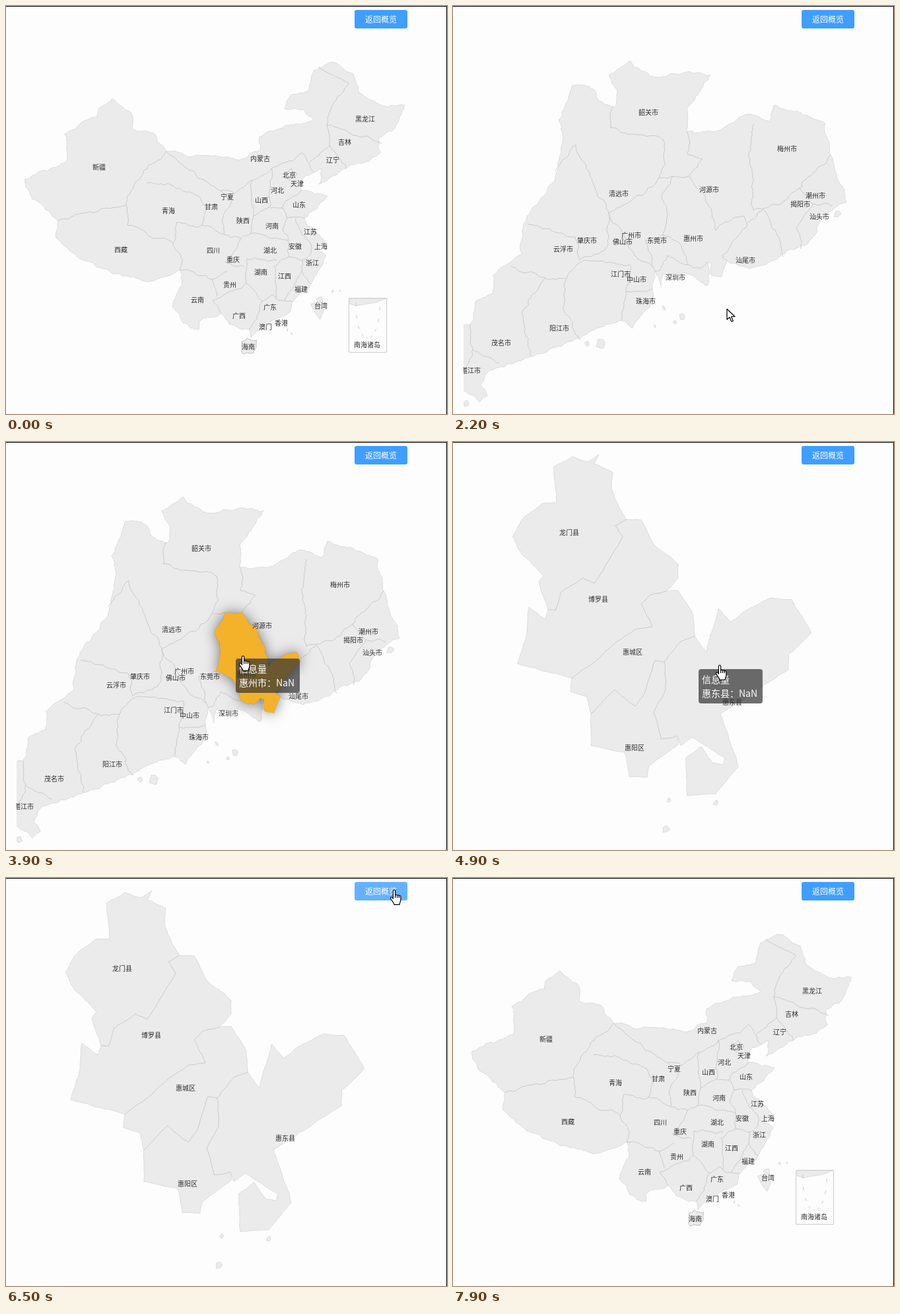
Write an HTML page that moves like this. It is 668x618 px and loops after 8 s.

```html
<!DOCTYPE html>
<html lang="zh">
<head>
<meta charset="utf-8">
<title>地图下钻</title>
<style>
  html, body { margin: 0; width: 100%; height: 100%; overflow: hidden; background: #fdfdfd; }
  svg { position: absolute; left: 0; top: 0; font-family: "Noto Sans CJK SC", "Noto Sans CJK", sans-serif; }
  .land { fill: #ebebeb; stroke: #d6d6d6; stroke-width: .8; stroke-linejoin: round; }
  .line { fill: none; stroke: #c6c6c6; stroke-width: .9; stroke-linejoin: round; }
  .area { fill: none; }
  .area.on { fill: #f4b22a; filter: drop-shadow(0 0 10px rgba(0,0,0,.5)); }
  .label { font-size: 10px; fill: #2b2b2b; text-anchor: middle; }
  #button { fill: #409eff; }
  #button.on { fill: #66b1ff; }
  #tip rect { fill: rgba(50,50,50,.7); }
  #tip text { font-size: 14px; font-weight: 500; fill: #fff; }
  #cursor path { fill: #fff; stroke: #000; stroke-width: 1.2; stroke-linejoin: round; }
</style>
</head>
<body>
<svg width="668" height="618" viewBox="0 0 668 618">
  <clipPath id="view"><rect x="16" width="652" height="608"/></clipPath>
  <g id="maps" clip-path="url(#view)"></g>
  <rect id="button" x="528" y="6" width="80" height="28" rx="3"/>
  <text x="568" y="24.5" font-size="12" font-weight="500" fill="#fff" text-anchor="middle">返回概览</text>
  <path d="M0 .5H667.5V618" fill="none" stroke="#000"/>
  <g id="tip">
    <rect id="tipBox" height="52" rx="4"/>
    <text x="5" y="21">信息量</text>
    <text x="5" y="42" id="tipName"></text>
  </g>
  <g id="cursor">
    <path id="arrow" d="M0 0V16L4 12.4 6.8 19 9.3 18 6.5 11.5H12Z"/>
    <g id="hand" transform="translate(-6.6 -.7)">
      <path d="M5 14V2.3a1.6 1.6 0 0 1 3.2 0V8.6c.6-1 2.6-.9 2.9.4.8-.9 2.5-.6 2.8.6.9-.6 2.6-.2 2.6 1.4v5c0 3-1.8 4-1.8 7H6.5c0-2.4-2.4-4.5-4.5-7.8-1.4-2-1.2-2.8-.4-3.3.9-.6 2.2.2 3.4 2.1z"/>
      <path d="M8.2 8.6v4M11.1 9v3.6M13.9 9.6v3"/>
    </g>
  </g>
</svg>
<script>
const $ = id => document.getElementById(id);

// Each map: named edges of key points, areas joined from edges ("-" runs one backwards)
const china = {
  rough: .28,
  edges: {
    north: '29,262 52,250 91,237 89,194 115,176 138,168 142,154 161,140 192,168 191,187 227,196 243,220 295,226 350,233 386,218 384,198 440,178 466,172 452,157 422,156 432,134 458,129 466,98 500,86 526,103 535,132 567,150 604,150 589,185 565,199 568,222',
    east: '540,238 516,246 474,270 478,247 449,262 447,279 487,288 452,322 470,343 486,358 472,371 485,378 462,421 434,448',
    gdCoast: '434,448 430,464 389,485 371,502 368,490',
    gxCoast: '368,490 338,482 326,465',
    south: '326,465 293,478 292,490 268,480 252,456 266,424 264,400 222,417 177,409 118,385 76,352 79,325 55,302 37,287 29,262',
    gdWest: '368,490 382,466 388,447',
    gdNorth: '388,447 403,437 413,446 434,448',
    gxNorth: '326,465 313,446 330,437 364,420 388,447',
    hainan: '357,508 366,503 380,506 374,526 359,527 357,508',
    xinjiang: '243,220 208,250 187,285 182,302 140,311 79,325',
    tibet: '182,302 184,332 253,360 267,385 264,400',
    qinghai: '213,268 252,272 288,286 302,305 296,332 258,328 253,360',
    steppe: '243,220 290,260 326,280 346,284 373,264 402,246 434,235 448,222 467,253',
    shaanxi: '326,280 342,298 328,322 330,346 355,352 370,345 375,318 373,264',
    shanxi: '375,318 400,304 402,246',
    northeast: '460,236 490,212 486,180 490,160 519,117 474,92',
    jilin: '486,180 520,192 569,208',
    liaoning: '490,212 516,246',
    beijing: '421,258 432,246 441,254 430,264 421,258',
    shandong: '400,306 418,306 424,295 447,279',
    henan: '418,306 426,321 452,322',
    hubei: '426,321 419,340 428,357 370,345',
    anhui: '438,322 448,346 463,368 449,385 448,402 462,421',
    jiangxi: '428,357 428,380 449,385',
    fujian: '448,402 427,436 422,446',
    hunan: '428,380 406,394 409,441',
    guizhou: '410,385 365,383 364,420',
    sichuan: '296,332 330,346',
    chongqing: '355,352 332,388 361,395',
    yunnan: '264,400 288,406 312,414 335,402',
    yunnanEast: '312,414 320,440'
  },
  land: 'north east gdCoast gxCoast south',
  areas: { 广西: 'gxCoast gxNorth -gdWest', 广东: 'gdCoast gdWest gdNorth', 海南: 'hainan' },
  islets: '472,461,13 476,448,8 495,432,2 506,431,2 426,491,2 433,496,2',
  labels: '黑龙江,544,171 吉林,513,206 辽宁,495,233 内蒙古,385,231 北京,429,256 天津,441,269 河北,411,279 山西,387,294 山东,444,301 新疆,141,244 青海,246,310 甘肃,311,304 宁夏,335,289 陕西,359,325 河南,403,333 江苏,461,342 西藏,174,369 四川,314,370 重庆,344,384 湖北,400,370 安徽,438,364 上海,477,364 浙江,464,389 湖南,386,403 江西,422,409 贵州,339,422 福建,447,429 云南,290,445 广西,353,469 广东,400,456 台湾,477,454 澳门,393,486 香港,417,480 海南,367,516 南海诸岛,547,513'
};

const guangdong = {
  rough: .3,
  edges: {
    north: '10,485 26,483 33,450 60,436 60,408 104,376 112,318 155,262 166,208 160,172 180,121 205,121 222,144 245,153 246,124 236,104 268,83 298,106 390,104 354,158 354,190 395,190 452,164 480,175 487,150 530,165 564,178 577,240 596,297 570,312 535,362 478,388 450,398 416,386',
    hzCoast: '416,386 406,411 392,408 391,390 385,388',
    bay: '385,388 384,424 350,404 318,406 315,426 306,402 302,428',
    zhCoast: '302,428 298,456 272,488 255,476',
    west: '255,476 210,492 180,508 117,531 55,552 42,575 52,590 40,600 10,577 10,485',
    hzWest: '385,388 375,398 356,392 345,362 318,347 324,305 316,290 333,258',
    hzEast: '333,258 357,258 387,303 398,340 440,318 446,332 408,378 416,386',
    zhInland: '255,476 262,432 302,428',
    shaoguan: '242,152 238,185 315,200 322,240 312,260 333,258',
    heyuan: '357,258 378,232 355,225 354,190',
    qingyuan: '155,250 186,210 212,268 236,315 290,284 312,260',
    foshan: '113,330 185,350 192,385 230,370 236,315 262,352 275,378 304,395',
    yunfu: '88,394 140,412 172,412 200,385 268,392 262,432',
    yangjiang: '140,412 104,465 117,531',
    jiangmen: '172,412 168,462 193,505',
    maoming: '26,483 30,520 70,541',
    zhanjiang: '16,552 30,520',
    dongguan: '318,347 292,355 306,402 325,378 356,392',
    meizhou: '456,178 450,232 455,310 500,296 573,225',
    shanwei: '446,328 470,308 490,345 500,380',
    jieyang: '525,275 545,300 520,335 527,368',
    chaozhou: '545,300 575,302'
  },
  land: 'north hzCoast bay zhCoast west',
  areas: { 惠州市: 'hzCoast hzWest hzEast', 珠海市: 'zhCoast zhInland' },
  islets: '225,509,11 203,513,5 306,485,4 320,457,4 336,480,5 348,471,6 583,314,8 20,604,8',
  labels: '韶关市,296,161 梅州市,506,216 清远市,251,284 河源市,388,278 潮州市,549,287 揭阳市,526,300 汕头市,555,319 广州市,270,347 佛山市,257,357 东莞市,309,355 惠州市,364,352 肇庆市,203,355 云浮市,167,368 汕尾市,443,385 江门市,254,406 中山市,278,414 深圳市,337,411 珠海市,292,447 阳江市,161,488 茂名市,73,510 湛江市,27,552'
};

const huizhou = {
  rough: .1,
  edges: {
    lmOut: '144,254 130,212 137,203 104,170 90,143 104,118 135,93 157,92 152,38 180,22 205,30 221,19 214,33 242,46 240,70 252,100 262,117',
    lmBl: '262,117 246,127 257,143 214,214 196,206 163,228 155,255 144,254',
    blEast: '262,117 285,118 304,155 341,185 341,206 322,226',
    blHc: '322,226 298,232 285,245 302,280 278,283 247,303 205,340 180,358',
    blWest: '180,358 150,350 98,336 110,300 115,250 140,268 144,254',
    hcEast: '322,226 341,225 364,262 366,294',
    hcHd: '366,294 345,302 320,333',
    hcHy: '320,333 306,331 288,385 276,400 245,375 209,412',
    hcWest: '209,412 202,385 178,378 180,358',
    hdOut: '366,294 384,318 402,252 420,273 442,256 480,236 512,238 543,288 508,322 508,345 455,380 405,412 432,492 398,533 355,536 353,478 376,461 393,486 409,489 412,478 362,447 345,460 340,445',
    hdHy: '340,445 315,450 304,410 322,375 320,333',
    hyOut: '340,445 341,458 308,482 297,491 294,508 267,507 260,470 209,460 209,412'
  },
  land: 'lmOut blEast hcEast hdOut hyOut hcWest blWest',
  areas: { 惠东县: 'hdOut hdHy -hcHd', 惠城区: 'hcEast hcHd hcHy hcWest -blHc', 博罗县: 'blEast blHc blWest -lmBl', 龙门县: 'lmOut lmBl' },
  islets: '327,542,4 398,546,6 323,587,6',
  labels: '龙门县,176,137 博罗县,220,238 惠城区,272,318 惠东县,423,394 惠阳区,275,463'
};

// Midpoint offsets depend on position only, so shared borders stay identical
const noise = (x, y) => {
  const v = Math.sin(x * 12.9898 + y * 78.233) * 43758.5453;
  return v - Math.floor(v) - .5;
};
function rugged(a, b, k) {
  const len = Math.hypot(b[0] - a[0], b[1] - a[1]);
  if (len < 5) return [b];
  const x = (a[0] + b[0]) / 2, y = (a[1] + b[1]) / 2, amp = Math.min(len, 20) * k;
  const m = [x + noise(x, y) * amp, y + noise(y, x) * amp];
  return [...rugged(a, m, k), ...rugged(m, b, k)];
}
const trace = (pts, k) =>
  'M' + pts.flatMap((p, i) => i ? rugged(pts[i - 1], p, k) : [p]).map(p => p.map(v => v.toFixed(1))).join('L');
const points = s => s.split(' ').map(p => p.split(',').map(Number));
const ring = (map, names) => names.split(' ').flatMap(n =>
  n[0] === '-' ? points(map.edges[n.slice(1)]).reverse() : points(map.edges[n]));
function islet([x, y, r]) {
  const corners = [0, 1, 2, 3, 4].map(i => {
    const a = i * 1.257, d = r * (.8 + noise(x + i, y));
    return [x + d * Math.cos(a) * .8, y + d * Math.sin(a)];
  });
  return 'M' + corners.join('L') + 'Z';
}

function add(parent, tag, attrs) {
  const el = document.createElementNS('http://www.w3.org/2000/svg', tag);
  for (const k in attrs) el.setAttribute(k, attrs[k]);
  return parent.appendChild(el);
}
function inset(g) {
  add(g, 'rect', { class: 'line', x: 519.5, y: 442.5, width: 57, height: 82 });
  add(g, 'path', { class: 'land', d: 'M521 443H576L560 449 530 454 521 451Z' });
  for (let i = 0; i < 9; i++) {
    const a = Math.PI * i / 8, x = 548 + 18 * Math.cos(a), y = 455 + 48 * Math.sin(a);
    add(g, 'path', { class: 'line', d: `M${x} ${y}l${-3 * Math.sin(a)} ${6 * Math.cos(a)}` });
  }
}
function build(map) {
  const g = map.group = add($('maps'), 'g', {}), k = map.rough;
  map.shapes = [];
  const draw = (cls, d, name) => {
    const el = add(g, 'path', { class: cls, d });
    if (cls !== 'line') map.shapes.push({ el, name, path: new Path2D(d) });
  };
  draw('land', trace(ring(map, map.land), k) + 'Z');
  if (map.edges.hainan) draw('land', trace(points(map.edges.hainan), k) + 'Z');
  for (const p of points(map.islets)) draw('land', islet(p));
  for (const e in map.edges) if (!map.land.split(' ').includes(e)) draw('line', trace(points(map.edges[e]), k));
  if (map === china) inset(g);
  for (const name in map.areas) draw('area', trace(ring(map, map.areas[name]), k) + 'Z', name);
  for (const item of map.labels.split(' ')) {
    const [name, x, y] = item.split(',');
    add(g, 'text', { class: 'label', x, y: +y + 3.6 }).textContent = name;
  }
}
const maps = [china, guangdong, huizhou];
maps.forEach(build);

// A map reacts to the pointer only once it is awake
const scenes = [
  { from: 0, map: china, awake: 0 },
  { from: 2100, map: guangdong, awake: 3150 },
  { from: 4100, map: huizhou, awake: 4950 },
  { from: 6800, map: china, awake: 8000 }
];
// Pointer stops: time, x, y
const stops = [[400, 497, 545], [700, 368, 520], [900, 368, 520], [1200, 350, 464], [1350, 415, 459], [2850, 415, 459],
  [3100, 406, 394], [3400, 286, 436], [3650, 322, 300], [3900, 359, 324], [4750, 359, 324], [4900, 404, 338], [5100, 404, 338],
  [5600, 190, 310], [5800, 190, 310], [6000, 190, 140], [6500, 588, 18], [7000, 588, 18], [7500, 668, 8]];
const tipLag = 150;

function pointer(t) {
  const i = stops.findIndex(s => s[0] > t);
  if (i < 1) return stops.at(i).slice(1);
  const a = stops[i - 1], b = stops[i], u = (t - a[0]) / (b[0] - a[0]), e = u * u * (3 - 2 * u);
  return [a[1] + (b[1] - a[1]) * e, a[2] + (b[2] - a[2]) * e];
}
const probe = document.createElement('canvas').getContext('2d');
const inside = ([x, y]) => s => probe.isPointInPath(s.path, x, y);
const areaAt = (map, p) => map.shapes.filter(s => s.name).find(inside(p))?.name;
const show = (el, on) => { el.style.display = on ? '' : 'none'; };
const move = (el, x, y) => el.setAttribute('transform', `translate(${Math.round(x)} ${Math.round(y)})`);

const start = performance.now();
function frame() {
  // The picture advances in tenths of a second
  const t = Math.floor((performance.now() - start) % 8000 / 100) * 100;
  const { map, awake } = scenes.filter(s => s.from <= t).pop();
  const here = t >= 400 && t < 7500;
  const [x, y] = pointer(t), [lx, ly] = pointer(t - tipLag);
  const hover = here && t >= awake ? areaAt(map, [x, y]) : null;
  const name = here && areaAt(map, [lx, ly]);
  const onButton = here && x > 528 && x < 608 && y > 6 && y < 34;
  const hand = onButton || map.shapes.some(inside([x, y]));

  maps.forEach(m => show(m.group, m === map));
  for (const s of map.shapes) if (s.name) s.el.classList.toggle('on', s.name === hover);
  show($('tip'), name);
  if (name) {
    $('tipName').textContent = name + '：NaN';
    $('tipBox').setAttribute('width', 55 + 14 * name.length);
    move($('tip'), lx + 13, ly + 20);
  }
  show($('cursor'), here);
  show($('hand'), hand);
  show($('arrow'), !hand);
  move($('cursor'), x, y);
  $('button').classList.toggle('on', onButton);
  requestAnimationFrame(frame);
}
frame();
</script>
</body>
</html>
```
